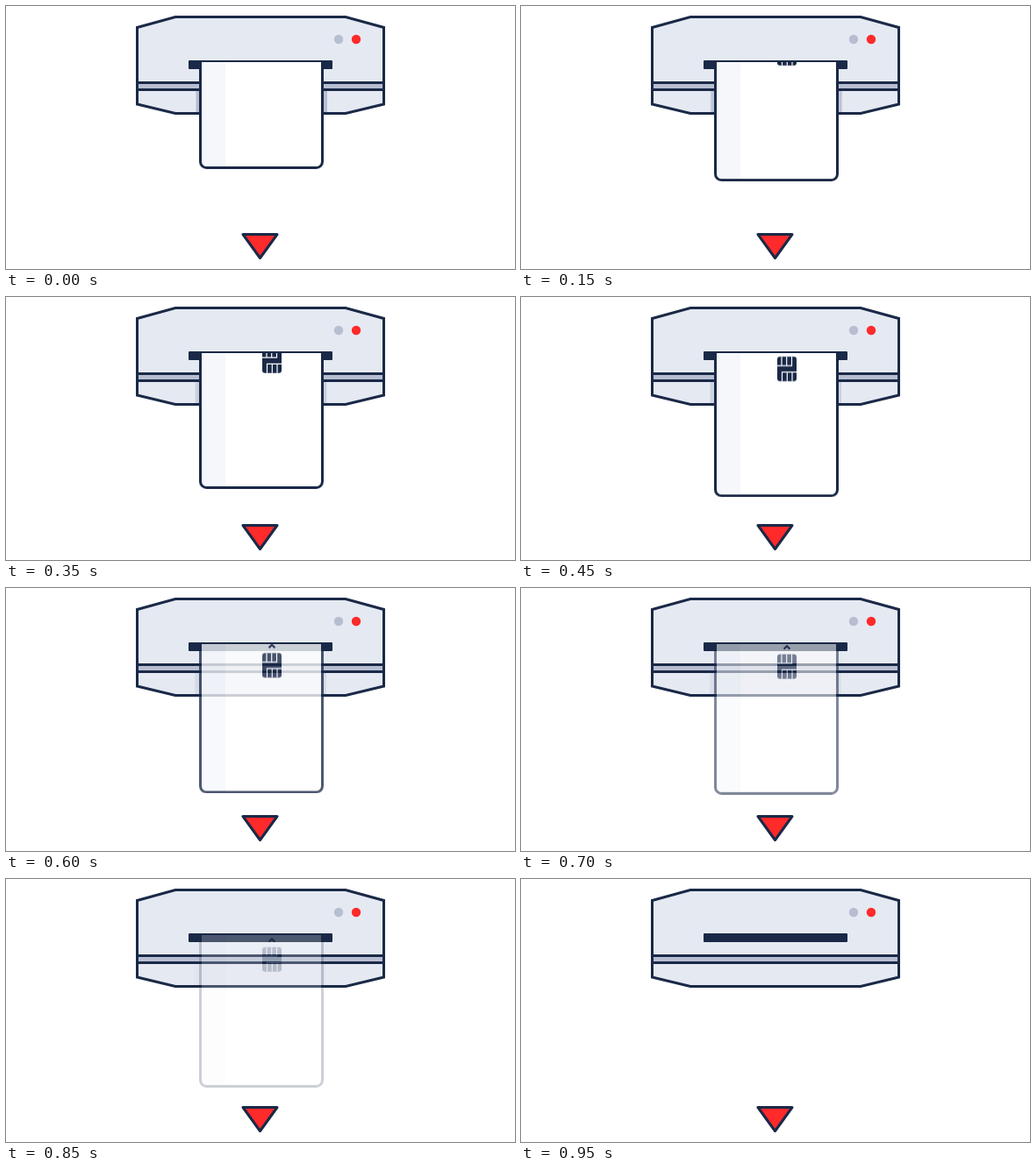
An HTML page for the animation above (1 s loop, 580 by 300 pixels).

```html
<!DOCTYPE html>
<html lang="en">
<head>
<meta charset="utf-8">
<title>Card dispenser</title>
<style>
  html, body { margin: 0; width: 100%; height: 100%; overflow: hidden; background: #fff; }
  svg { display: block; width: 580px; height: 300px; }

  .ink { fill: #1a2947; }
  .line { stroke: #1a2947; stroke-width: 3; stroke-linejoin: round; }
  .body { fill: #e5e9f2; }
  .grey { fill: #b7bed1; }
  .red { fill: #ff2a2a; }
  .gap { fill: none; stroke: #fff; stroke-width: 1.2; }

  /* The card moves in 50 ms ticks: a quick feed, then a slow drift while fading. */
  .card { animation: eject 1s infinite; }
  .shadow { animation: fade 1s infinite; }

  @keyframes eject {
    0%   { transform: translateY(0); opacity: 1; animation-timing-function: steps(10, end); }
    50%  { transform: translateY(47px); opacity: 1; animation-timing-function: steps(9, end); }
    95%, 100% { transform: translateY(53.3px); opacity: 0; }
  }
  @keyframes fade {
    0%   { transform: translateX(0); opacity: 1; animation-timing-function: steps(19, end); }
    95%, 100% { transform: translateX(-2px); opacity: 0; }
  }
</style>
</head>
<body>
<svg viewBox="0 0 580 300">
  <defs>
    <clipPath id="mouth"><rect x="200" y="64" width="180" height="236"/></clipPath>
  </defs>

  <!-- machine -->
  <path class="body" d="M149.5 24.5 193 12.5H387L430.5 24.5V112L387 122.5H193L149.5 112Z"/>
  <rect class="shadow grey" x="216.5" y="97" width="149.5" height="25"/>
  <rect class="grey" x="149.5" y="88" width="281" height="7"/>
  <path class="line" d="M149.5 87.5H430.5M149.5 95.5H430.5"/>
  <path class="line" fill="none" style="stroke-linejoin:miter" d="M149.5 24.5 193 12.5H387L430.5 24.5V112L387 122.5H193L149.5 112Z"/>
  <circle class="grey" cx="379" cy="38" r="5.2"/>
  <circle class="red" cx="399" cy="38" r="5.2"/>
  <rect class="ink" x="208" y="62" width="164" height="10" rx="1"/>

  <!-- card -->
  <g clip-path="url(#mouth)">
    <g class="card">
      <rect x="221.5" y="-6" width="139" height="190.5" rx="7" fill="#fff"/>
      <path d="M250 -6V184.5H228.5A7 7 0 0 1 221.5 177.5V-6Z" fill="#f5f7fb"/>
      <rect class="line" x="221.5" y="-6" width="139" height="190.5" rx="7" fill="none"/>
      <path d="M299.6 19.8 303 16.4 306.4 19.8" fill="none" stroke="#1a2947" stroke-width="2"/>
      <rect class="ink" x="292" y="25.8" width="22" height="28" rx="3"/>
      <path class="gap" d="M292 36.2H308.5V25.8M297 25.8V36.2M302.7 25.8V36.2"/>
      <path class="gap" d="M314 43.4H297.5V53.8M303.3 43.4V53.8M309 43.4V53.8"/>
    </g>
  </g>

  <!-- direction marker -->
  <path class="red line" d="M270 260.5H309L289.5 287.5Z"/>
</svg>
</body>
</html>
```
